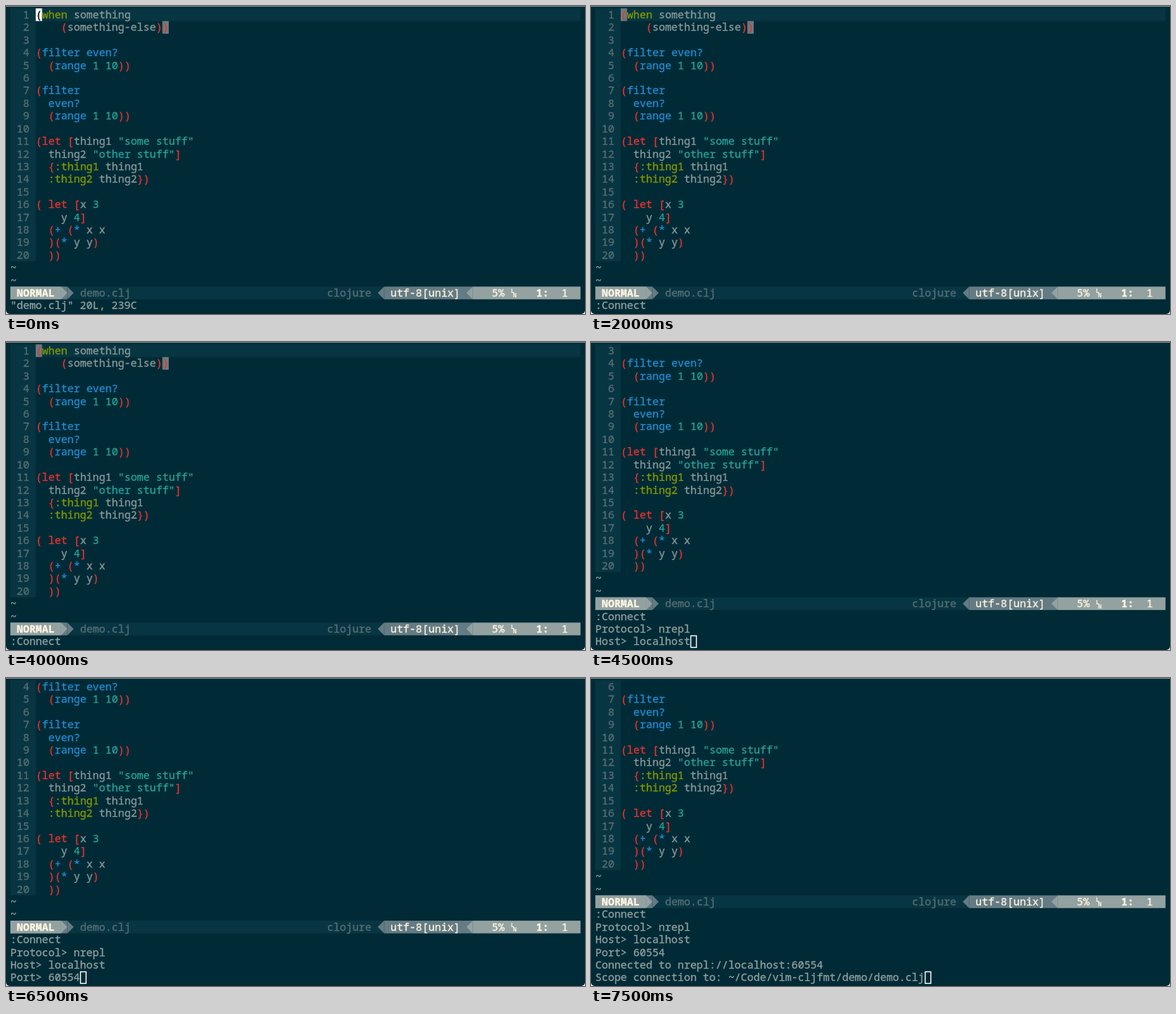
Recreate the animation shown at these times as an HTML page with a canvas. Size 797 by 424 pixels, loop 8 s.

```html
<!DOCTYPE html>
<html lang="en">
<head>
<meta charset="utf-8">
<title>Connecting to a REPL</title>
<style>
  html, body { margin: 0; width: 100%; height: 100%; overflow: hidden; background: #fff; }
  canvas { display: block; border-radius: 0 0 5px 5px; }
</style>
</head>
<body>
<canvas id="stage" width="797" height="424"></canvas>
<script>
const ctx = document.getElementById('stage').getContext('2d');
const LOOP = 8000, LEFT = 6, TOP = 3.3, CELL_W = 8.72, CELL_H = 17.41, COLS = 90, ROWS = 24;
const FONT = '14.533px "Noto Sans Mono", "DejaVu Sans Mono", monospace';
const C = {
  back: '#002b36', panel: '#073642', edge: '#82959a', dim: '#586e75', mid: '#657b83',
  text: '#8b9a9b', light: '#93a1a1', cream: '#fdf6e3', red: '#ea332f', green: '#859900',
  blue: '#268bd2', cyan: '#2aa198', match: '#6c7b7e'
};

const code = `(when something
    (something-else))

(filter even?
  (range 1 10))

(filter
  even?
  (range 1 10))

(let [thing1 "some stuff"
  thing2 "other stuff"]
  {:thing1 thing1
  :thing2 thing2})

( let [x 3
    y 4]
  (+ (* x x
  )(* y y)
  ))`.split('\n');

const syntax = [
  [/^"/, C.cyan], [/^\d/, C.cyan], [/^(:|when$)/, C.green],
  [/^([()[\]{}]|let$)/, C.red], [/^(filter|even\?|range|[+*])$/, C.blue], [/./, C.text]
];

// Each step: start time, cursor column in the last message line (-1: none), message lines
const connect = ':Connect', protocol = 'Protocol> nrepl', host = 'Host> localhost', port = 'Port> 60554';
const menu = 'Type number and <Enter> or click with mouse (empty cancels): ';
const scope = 'Scope connection to: ~/Code/vim-cljfmt/demo/demo.clj';
const steps = [
  [0, -1, ['"demo.clj" 20L, 239C']],
  [500, 1, [':']],
  [1000, 4, [':Con']],
  [1500, 8, [connect]],
  [2000, -1, [connect]],
  [3000, 61, ['Protocol>', ' 1. nrepl', menu]],
  [3500, 62, ['Protocol>', ' 1. nrepl', menu + '1']],
  [4000, -1, [connect]],
  [4500, 15, [connect, protocol, host]],
  [5500, 0, [connect, protocol, host]],
  [6000, 6, [connect, protocol, host, 'Port> ']],
  [6500, 11, [connect, protocol, host, port]],
  [7000, 52, [connect, protocol, host, port, 'Connected to nrepl://localhost:60554', scope]]
];

const x = col => LEFT + col * CELL_W;
const y = row => TOP + row * CELL_H;

function fill(col, row, cols, color, rows = 1) {
  ctx.fillStyle = color;
  ctx.fillRect(x(col), y(row), cols * CELL_W, rows * CELL_H);
}

// The thin stroke gives the slightly heavy look of smoothed terminal text
function write(text, col, row, color, weight = '') {
  ctx.font = `${weight} ${FONT}`;
  ctx.fillStyle = ctx.strokeStyle = color;
  ctx.lineWidth = 0.3;
  ctx.fillText(text, x(col), y(row) + 13.7);
  ctx.strokeText(text, x(col), y(row) + 13.7);
}

function arrow(base, tip, row, color) {
  ctx.fillStyle = color;
  ctx.beginPath();
  ctx.moveTo(x(base), y(row));
  ctx.lineTo(x(tip), y(row + 0.5));
  ctx.lineTo(x(base), y(row + 1));
  ctx.fill();
}

function writeCode(line, row) {
  for (const token of line.matchAll(/"[^"]*"|[()[\]{}]|[^\s()[\]{}]+/g)) {
    const color = syntax.find(([pattern]) => pattern.test(token[0]))[1];
    write(token[0], 4 + token.index, row, color);
  }
}

function drawBuffer(shift, focused) {
  fill(0, 0, 4, C.panel, code.length - shift);
  code.forEach((line, i) => {
    const row = i - shift;
    if (row < 0) return;
    if (i === 0) {
      fill(4, row, COLS - 4, C.panel);
      fill(4, row, 1, focused ? '#fff' : C.match);
    }
    if (i === 1) fill(24, row, 1, C.match);
    write(String(i + 1).padStart(3), 0, row, C.dim);
    writeCode(line, row);
    if (i === 0 && focused) write('(', 4, row, C.back);
  });
  for (const i of [20, 21]) write('~', 0, i - shift, C.text);
}

function drawStatus(row) {
  fill(0, row, COLS, C.panel);
  fill(0, row, 9, C.mid);
  fill(0, row, 8, C.light);
  arrow(8, 9, row, C.light);
  arrow(9, 10, row, C.mid);
  write('NORMAL', 1, row, C.cream, 'bold');
  write('demo.clj', 11, row, C.dim);
  write('clojure', 50, row, C.dim);
  arrow(59, 58, row, C.mid);
  fill(59, row, 14, C.mid);
  write('utf-8[unix]', 60, row, C.cream);
  arrow(73, 72, row, C.light);
  fill(73, row, COLS - 73, C.light);
  write('5%', 76, row, C.cream);
  write('1:', 83, row, C.cream, 'bold');
  write('1', 87, row, C.cream);
  ctx.font = 'bold 8px "Noto Sans Mono", monospace';
  ctx.fillText('L', x(79), y(row) + 9);
  ctx.fillText('N', x(79) + 3, y(row) + 15);
}

function draw(time) {
  const [start, cursor, lines] = steps.findLast(step => step[0] <= time);
  const shift = lines.length - 1;
  ctx.fillStyle = C.back;
  ctx.fillRect(0, 0, 797, 424);
  ctx.fillStyle = C.edge;
  ctx.fillRect(0, 0, 797, 1);
  drawBuffer(shift, start === 0);
  drawStatus(ROWS - 2 - shift);
  lines.forEach((line, i) => write(line, 0, ROWS - lines.length + i, C.light));
  if (cursor >= 0) {
    ctx.strokeStyle = '#fff';
    ctx.lineWidth = 1.4;
    ctx.strokeRect(x(cursor) + 0.6, y(ROWS - 1) + 0.7, CELL_W - 1, CELL_H - 1.4);
  }
}

function tick() {
  draw(performance.now() % LOOP);
  requestAnimationFrame(tick);
}
tick();
</script>
</body>
</html>
```
